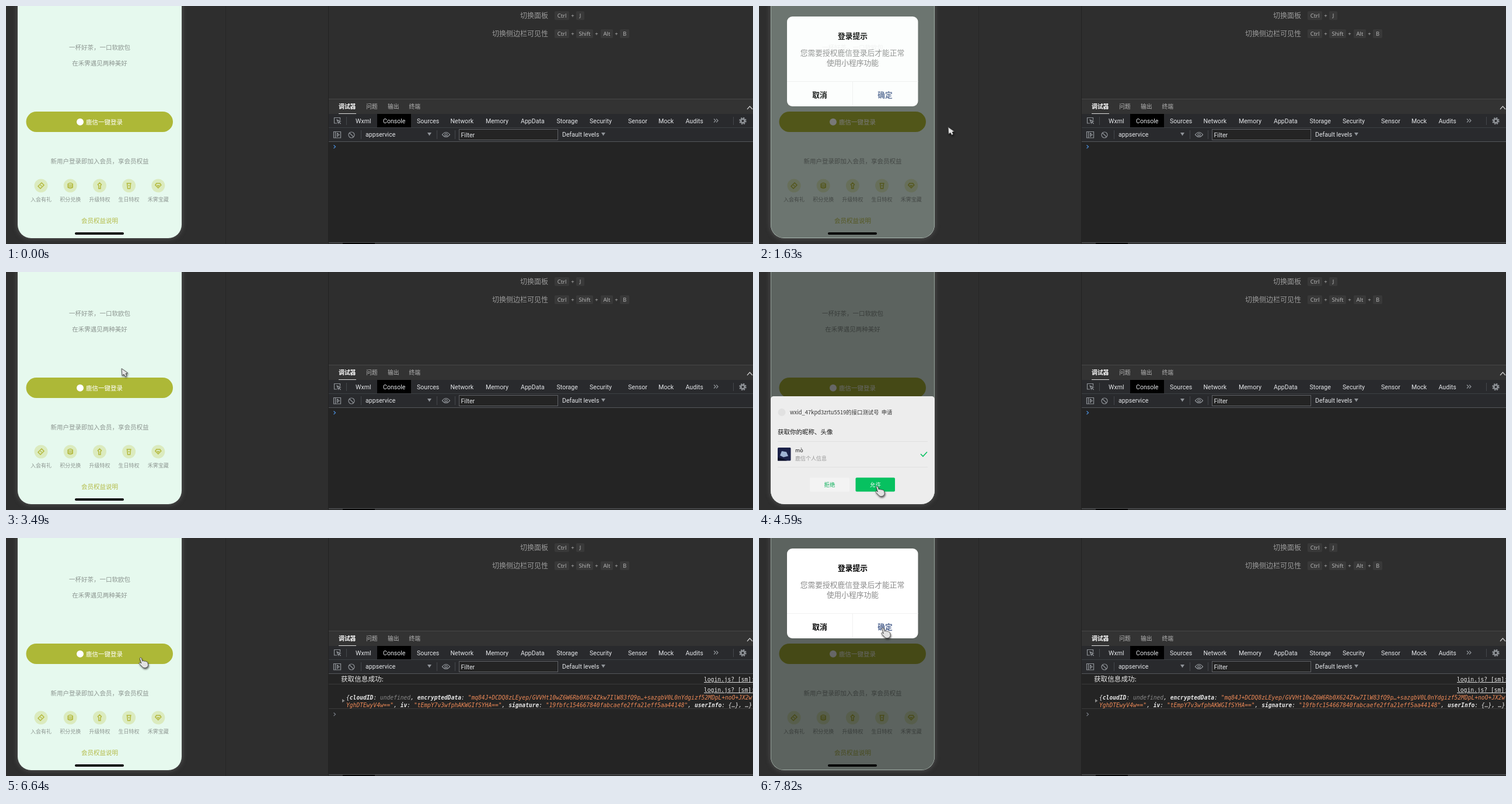
Recreate the animation shown at these times as an HTML page. Size 1280 by 408 pixels, loop 8 s.

```html
<!DOCTYPE html>
<html lang="zh-CN">
<head>
<meta charset="utf-8">
<title>登录演示</title>
<style>
html, body { margin: 0; width: 100%; height: 100%; overflow: hidden; background: #2e2e2e; }
svg { display: block; width: 1280px; height: 408px; }
text { font: 10.5px "Noto Sans CJK SC", "Noto Sans CJK", sans-serif; white-space: pre; }
.mid { text-anchor: middle; }
.hint { font-size: 12px; fill: #9b9b9b; text-anchor: end; }
.key text { font: 9.5px "Open Sans", sans-serif; fill: #bcbcbc; text-anchor: middle; }
.key rect { fill: #393939; }
.panel text { font-size: 9.8px; fill: #b4b4b4; }
.panel .on { fill: #fff; font-weight: bold; }
.tools text { font: 10.6px Roboto, sans-serif; fill: #e4e6e9; }
.icon { fill: none; stroke: #8f9398; stroke-width: 1.2; }
.sep { stroke: #45484c; }
.log text { font: 9.63px "DejaVu Sans Mono", "Noto Sans CJK SC", monospace; fill: #e8e8e8; }
.log .cjk { font: 11.6px "Noto Sans CJK SC", monospace; }
.log .obj { font-style: italic; }
.log .prop { font-weight: bold; }
.log .str { fill: #ee8a58; }
.log .undef { fill: #888; }
.log .link { text-decoration: underline; }
.phone { filter: drop-shadow(0 0 4px #77777799); }
.copy { fill: #8d9691; }
.perk circle { fill: #dbebbf; }
.perk path { fill: none; stroke: #b3b83c; stroke-width: 1.5; }
.perk text { font-size: 9px; fill: #8d9691; text-anchor: middle; }
.card text { font-size: 12.75px; text-anchor: middle; }
.card .bold { font-weight: bold; }
.sheet .small { font-size: 9px; }
.sheet .name { font-size: 9.4px; }
.cursor { filter: drop-shadow(1px 2px 1.5px #0009); }
.cursor path { fill: #e2e2e2; stroke: #484848; stroke-width: .9; stroke-linejoin: round; }
</style>
</head>
<body>
<svg viewBox="0 0 1280 408">
  <defs>
    <rect id="mask" x="20.4" y="-60" width="280.2" height="457.6" rx="22.6" opacity=".6"/>
  </defs>

  <path d="M376.5 0V408" stroke="#262626"/>
  <path d="M552.5 0V408" stroke="#222"/>

  <text class="hint" x="929" y="20.5">切换面板</text>
  <text class="hint" x="929" y="51.5">切换侧边栏可见性</text>
  <g id="keys" class="key"></g>

  <g class="panel">
    <rect x="553" y="160" width="727" height="25" fill="#333"/>
    <path d="M553 159.5H1280" stroke="#484848"/>
    <text class="on" x="570" y="176">调试器</text>
    <text x="617" y="176">问题</text>
    <text x="654" y="176">输出</text>
    <text x="690.5" y="176">终端</text>
    <path d="M570 184.5H600" stroke="#ddd"/>
    <path d="M1270 177l4.5-5 4.5 5" fill="none" stroke="#ccc" stroke-width="1.2"/>
  </g>

  <rect x="553" y="185" width="727" height="48" fill="#292a2d"/>
  <rect x="553" y="233" width="727" height="172" fill="#242424"/>
  <path d="M553 208.5H1280" stroke="#3d4043"/>
  <path d="M553 232.5H1280M553 405.5H1280" stroke="#55575a"/>
  <path d="M577 407H632" stroke="#000" stroke-width="2"/>
  <rect x="636" y="185" width="58" height="23" fill="#000"/>
  <g id="tools" class="tools">
    <text x="616" y="224">appservice</text>
    <text x="953" y="224">Default levels</text>
    <rect x="776.5" y="211.5" width="169" height="18" fill="#242424" stroke="#5f6165"/>
    <text x="779.5" y="225">Filter</text>
  </g>
  <path class="sep" d="M583.5 190V204M1246.5 190V204M608.5 213V228M738.5 213V228M769.5 213V228"/>
  <path d="M722 217h7l-3.5 5.5zM1020 217h7l-3.5 5.5z" fill="#8f9398"/>
  <g class="icon">
    <path d="M567 201h-4.5v-9.5h10v4M567 195l6 2.5-2.6 1-1 2.6zM570.5 198.5l3 3.5"/>
    <path d="M561.5 215.5h12v10.5h-12zM564.5 215.5v10.5M567.5 218l3.5 2.8-3.5 2.8z"/>
    <circle cx="592" cy="221" r="5"/><path d="M588.5 217.5l7 7"/>
    <path d="M747.5 220.5q6.5-8 13 0q-6.5 8-13 0z"/><circle cx="754" cy="220.5" r="2"/>
    <path d="M1213 193.5l3 3-3 3M1217 193.5l3 3-3 3"/>
    <circle cx="1262.5" cy="197" r="3.3" stroke-width="2.6"/>
    <circle cx="1262.5" cy="197" r="5.3" stroke-width="1.8" stroke-dasharray="2.4 1.76"/>
  </g>
  <path id="prompt" d="M561.5 238.5l3 2.8-3 2.8" fill="none" stroke-width="1.2"/>

  <g id="log" class="log">
    <text class="cjk" x="574" y="246">获取信息成功:</text>
    <text class="link" x="1196" y="246">login.js? [sm]:10</text>
    <text class="link" x="1196" y="264">login.js? [sm]:11</text>
    <path d="M553 250.5H1280M553 292.5H1280" stroke="#3a3a3a"/>
    <path d="M576 276l4.5 3-4.5 3z" fill="#888"/>
    <text class="obj" x="583" y="276.5">{<tspan class="prop">cloudID</tspan>: <tspan class="undef">undefined</tspan>, <tspan class="prop">encryptedData</tspan>: <tspan class="str">"mq84J+DCDQ8zLEyep/GVVHt10wZ6W6Rb0X624Zkw7IlW83fQ9p…+sazgbV0L0nYdgizf52MDpL+noO+JX2w</tspan></text>
    <text class="obj" x="583" y="289.5"><tspan class="str">YghDTEwyV4w=="</tspan>, <tspan class="prop">iv</tspan>: <tspan class="str">"tEmpY7v3wfphAKWGIfSYHA=="</tspan>, <tspan class="prop">signature</tspan>: <tspan class="str">"19fbfc154667840fabcaefe2ffa21eff5aa44148"</tspan>, <tspan class="prop">userInfo</tspan>: {…}, …}</text>
  </g>

  <rect class="phone" x="20" y="-60" width="281" height="458" rx="23" fill="#e6f9ee"/>
  <text class="copy mid" x="160.5" y="75">一杯好茶，一口软欧包</text>
  <text class="copy mid" x="160.5" y="102">在禾霁遇见两种美好</text>
  <rect x="34.5" y="181" width="251.5" height="35" rx="17.5" fill="#adb837"/>
  <circle cx="127" cy="198.7" r="6" fill="#fff"/>
  <text x="137" y="202.5" fill="#fff">鹿信一键登录</text>
  <text class="copy mid" x="160.5" y="270">新用户登录即加入会员，享会员权益</text>
  <g id="perks" class="perk"></g>
  <text class="mid" x="160.5" y="372" fill="#b4bb48">会员权益说明</text>
  <rect x="118" y="388" width="84" height="4" rx="2" fill="#080808"/>

  <g id="dialog">
    <use href="#mask"/>
    <g class="card">
      <rect x="48" y="18" width="224.5" height="154" rx="9" fill="#fff"/>
      <path id="press" d="M160 130h112.5v33a9 9 0 0 1-9 9H160z" fill="#ebebeb"/>
      <path d="M48 129.5H272.5M160.5 130V172" stroke="#f1f1f1"/>
      <text class="bold" x="160.5" y="55.5">登录提示</text>
      <text x="160" y="85" fill="#8a8a8a">您需要授权鹿信登录后才能正常</text>
      <text x="160.5" y="102.3" fill="#8a8a8a">使用小程序功能</text>
      <text class="bold" x="104" y="156.7">取消</text>
      <text class="bold" x="216" y="156.7" fill="#576b95">确定</text>
    </g>
  </g>

  <g id="sheet" class="sheet">
    <use href="#mask"/>
    <path d="M20 218a5 5 0 0 1 5-5h271a5 5 0 0 1 5 5v157a23 23 0 0 1-23 23H43a23 23 0 0 1-23-23z" fill="#ededed"/>
    <circle cx="39" cy="240.5" r="6.5" fill="#e1e1e1"/>
    <text class="name" x="53" y="244" fill="#333">wxid_47kpd3zrtu5519的接口测试号 <tspan dx="2">申请</tspan></text>
    <text x="32" y="278" fill="#151515">获取你的昵称、头像</text>
    <path d="M32 290.5H289M32 334.5H289" stroke="#e0e0e0"/>
    <rect x="32" y="301" width="22.5" height="22.5" rx="1.5" fill="#1b2148"/>
    <path d="M39 307l8 1.5 3 7-8 2-6-3z" fill="#9fb3d4"/>
    <path d="M32 318l9 2 7 3.5H32z" fill="#0c1029"/>
    <text class="small" x="62" y="309" fill="#222">mò</text>
    <text class="small" x="62" y="323" fill="#999">鹿信个人信息</text>
    <path d="M277 312l4 4 7-7.5" fill="none" stroke="#07c160" stroke-width="1.6"/>
    <rect x="87" y="352.5" width="68" height="24" rx="2" fill="#f3f3f3"/>
    <rect id="allow" x="165.5" y="352.5" width="67.5" height="24" rx="2"/>
    <text class="name mid" x="121" y="367.5" fill="#06ae56">拒绝</text>
    <text class="name mid" x="199.5" y="367.5" fill="#fff">允许</text>
  </g>

  <g id="cursor">
    <circle id="ring" r="11" fill="#f6f05f" opacity=".9"/>
    <g class="cursor">
      <path id="arrow" d="M0 0L1 12 4 9.8 6.3 13.8 8.8 12.3 7 8.7 10.6 7.6z"/>
      <path id="hand" d="M-1.2 1.2C-.8-.4 1-.4 1.6 1L3.4 6C5 5 6.3 5.4 6.8 6.4C8 5.6 9.3 6 9.8 7C11 6.8 12 7.4 12.4 8.6L13.2 12C13.6 14.5 11.5 17 8.5 17.6C6 18 4 17 2.5 15L-2 10.4C-3 9-1.4 7.8 0 8.8L1.4 9.8z"/>
    </g>
  </g>
</svg>
<script>
const LOOP = 8000;
const $ = id => document.getElementById(id);
const put = (id, html) => $(id).insertAdjacentHTML('beforeend', html);

const key = (x, w, y, s) =>
  `<rect x="${x}" y="${y}" width="${w}" height="15" rx="2"/><text x="${x + w / 2}" y="${y + 11}">${s}</text>`;
const plus = (x, y) => `<text x="${x}" y="${y + 11}">+</text>`;
put('keys', key(940, 25, 9, 'Ctrl') + plus(971, 9) + key(977, 14, 9, 'J') +
  key(940, 25, 40, 'Ctrl') + plus(971, 40) + key(977, 29, 40, 'Shift') + plus(1012, 40) +
  key(1019, 21, 40, 'Alt') + plus(1046, 40) + key(1052, 16, 40, 'B'));

const tabs = { Wxml: 599, Console: 646, Sources: 704, Network: 761.5, Memory: 822, AppData: 882,
  Storage: 943.5, Security: 1000, Sensor: 1066, Mock: 1118, Audits: 1164.5 };
put('tools', Object.entries(tabs).map(([s, x]) => `<text x="${x}" y="200.5">${s}</text>`).join(''));

const perks = [
  ['入会有礼', 'M-5 1L1-5 5-1-1 5zM-1-1L1 1'],
  ['积分兑换', 'M-4-3Q0-6 4-3V3Q0 6-4 3zM-4-1H4M-4 2H4'],
  ['升级特权', 'M0-5L3-2 1.5 0V5H-1.5V0L-3-2z'],
  ['生日特权', 'M-4-4H4M-3-4L-2 5H2L3-4M0-1V1'],
  ['禾霁宝藏', 'M-5-1L-3-4H3L5-1 0 4zM-2-1L0 1 2-1']
];
put('perks', perks.map(([s, d], i) => {
  const x = 60 + i * 50.2;
  return `<circle cx="${x}" cy="308" r="11.5"/><path d="${d}" transform="translate(${x} 308)"/>
    <text x="${x}" y="334.5">${s}</text>`;
}).join(''));

// Screen updates come in bursts: start, end, number of steps
const bursts = [[0, 0, 1], [70, 830, 11], [890, 890, 1], [1160, 1770, 9], [2100, 2790, 10],
  [3140, 3490, 6], [3820, 3820, 1], [4020, 4590, 9], [4920, 4920, 1], [5120, 5900, 12],
  [5970, 6770, 11], [6840, 7610, 11], [7680, 7820, 3]];

function snap(t) {
  const [start, end, n] = bursts.findLast(b => b[0] <= t);
  if (n === 1) return start;
  const step = (end - start) / (n - 1);
  return Math.min(end, start + step * Math.floor((t - start + 15) / step));
}

// Pointer track: time, x, y
const track = [[70, 883, 362], [300, 740, 330], [520, 420, 230], [680, 230, 183], [830, 177, 194],
  [890, 178, 195], [1240, 178, 195], [1617, 324, 207.5], [2030, 324, 207.5], [2350, 275, 186],
  [2600, 208, 158], [2790, 191, 152], [3210, 191, 152], [3490, 198, 165.5], [3950, 198, 165.5],
  [4150, 240, 220], [4300, 282, 330], [4430, 262, 392], [4590, 202, 367], [4850, 202, 367],
  [4920, 201, 366], [5190, 201, 366], [5616, 674.5, 328], [5900, 619, 284], [6200, 470, 250],
  [6500, 265, 212], [6770, 180, 195], [6917, 180, 195], [7071, 261.5, 219], [7200, 285, 221],
  [7400, 255, 192], [7610, 215, 159], [7820, 212, 154]];

function pointer(t) {
  const i = track.findIndex(p => p[0] > t);
  if (i < 0) return track.at(-1).slice(1);
  if (!i) return track[0].slice(1);
  const [a, b] = [track[i - 1], track[i]];
  const k = (t - a[0]) / (b[0] - a[0]);
  return [a[1] + (b[1] - a[1]) * k, a[2] + (b[2] - a[2]) * k];
}

const within = (t, a, b) => t >= a && t < b;
const ramp = (t, a, d) => Math.min(1, Math.max(0, (t - a) / d));
const show = (id, on) => { $(id).style.display = on ? '' : 'none'; };

function draw(now) {
  const t = snap(now % LOOP);
  const fade = ramp(t, 1335, 320) - ramp(t, 3210, 280) + ramp(t, 7007, 320);
  const sheet = within(t, 3820, 5250);
  const logged = t >= 5325;
  const [x, y] = pointer(t);
  const inside = (l, top, r, b) => x > l && x < r && y > top && y < b;

  $('dialog').style.opacity = fade;
  show('press', within(t, 3140, 3270));
  show('sheet', sheet);
  $('allow').setAttribute('fill', within(t, 5120, 5250) ? '#06ad56' : '#07c160');
  show('log', logged);
  $('prompt').setAttribute('transform', `translate(0 ${logged ? 61 : 0})`);
  $('prompt').setAttribute('stroke', logged ? '#777c85' : '#4b8fdc');

  const hand = sheet ? inside(166, 352, 233, 376)
    : fade > 0.5 ? inside(48, 130, 272, 172)
    : inside(35, 181, 286, 216);
  show('cursor', t >= 70);
  show('hand', hand);
  show('arrow', !hand);
  show('ring', [1160, 3140, 5120, 6840].some(c => within(t, c, c + 120)));
  $('cursor').setAttribute('transform', `translate(${x.toFixed(1)} ${y.toFixed(1)})`);
}

function tick() {
  draw(performance.now());
  requestAnimationFrame(tick);
}
tick();
</script>
</body>
</html>
```
